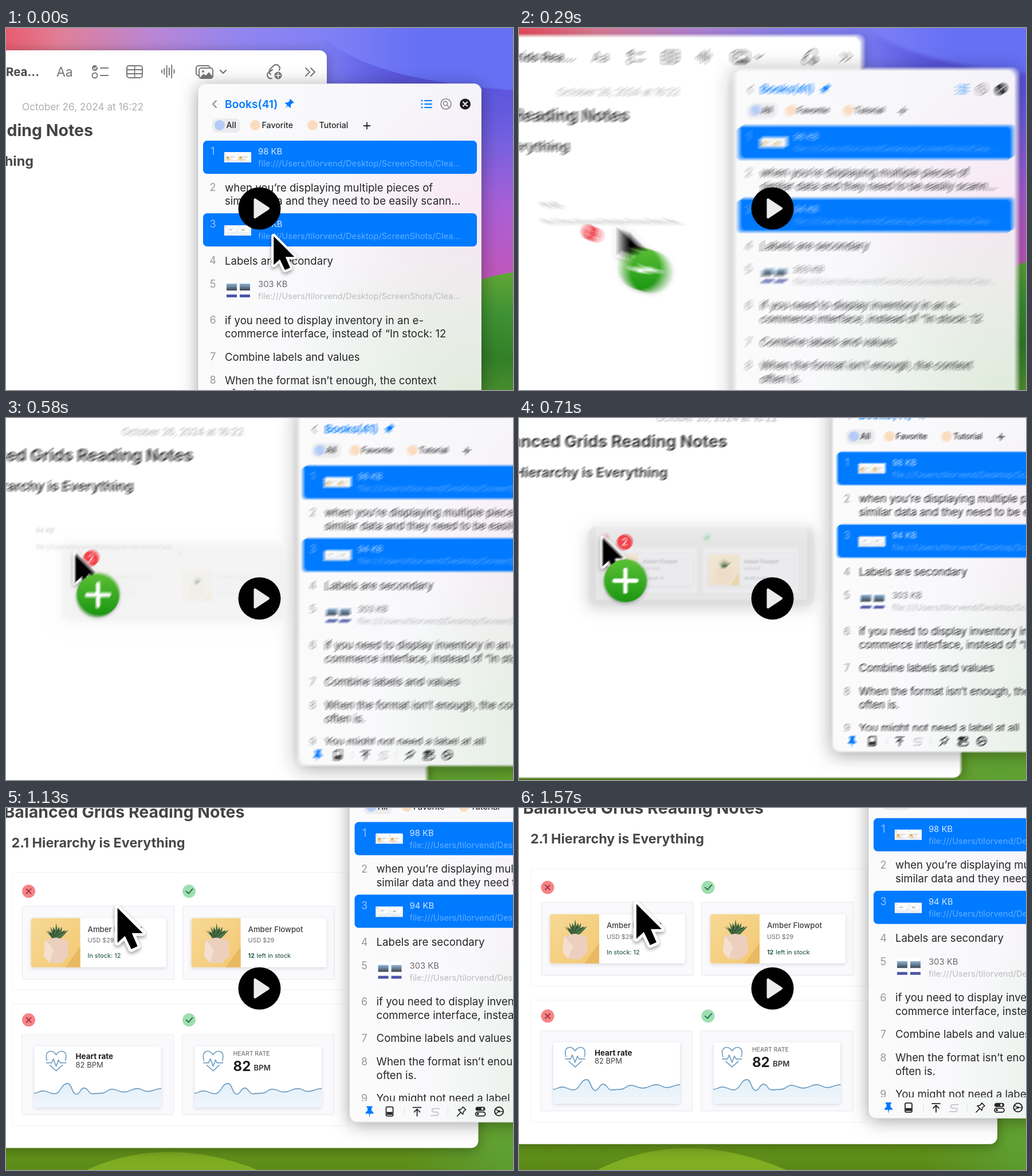
Recreate the animation shown at these times as an HTML page with a canvas. Size 885 by 633 pixels, loop 1630 ms.

```html
<!DOCTYPE html>
<html lang="en">
<head>
<meta charset="utf-8">
<title>Drag to notes</title>
<style>
html, body { margin: 0; width: 100%; height: 100%; overflow: hidden; background: #fff; }
canvas { display: block; width: 885px; height: 633px; }
</style>
</head>
<body>
<canvas id="stage" width="885" height="633"></canvas>
<script>
const W = 885, H = 633, LOOP = 1630, STEP = 1000 / 24, SHUTTER = 24;
const out = document.getElementById('stage').getContext('2d');
const buffer = Object.assign(document.createElement('canvas'), { width: W, height: H });
const g = buffer.getContext('2d', { alpha: false });
const BLUE = '#007aff', GRAY = '#77777a', INK = '#262628';
const PATH = 'file:///Users/tilorvend/Desktop/ScreenShots/Clea...';

const ramp = (t, a, b) => Math.min(1, Math.max(0, (t - a) / (b - a)));
// Critically damped spring from 0 to 1
const spring = (t, start, speed) => {
  const x = Math.max(0, t - start) * speed;
  return 1 - (1 + x) * Math.exp(-x);
};

function text(s, x, y, size, color = INK, weight = 400, align = 'left') {
  g.font = `${weight} ${size}px Inter, sans-serif`;
  g.fillStyle = color;
  g.textAlign = align;
  g.fillText(s, x, y + size * 0.35);
}
function box(x, y, w, h, r, fill, stroke, lw = 1) {
  g.beginPath();
  g.roundRect(x, y, w, h, r);
  if (fill) { g.fillStyle = fill; g.fill(); }
  if (stroke) { g.strokeStyle = stroke; g.lineWidth = lw; g.stroke(); }
}
function dot(x, y, r, fill, stroke, lw = 2) {
  g.beginPath();
  g.arc(x, y, r, 0, 7);
  if (fill) { g.fillStyle = fill; g.fill(); }
  if (stroke) { g.strokeStyle = stroke; g.lineWidth = lw; g.stroke(); }
}
function shape(d, fill) {
  g.fillStyle = fill;
  g.fill(new Path2D(d));
}
function line(d, color, lw = 2) {
  g.strokeStyle = color;
  g.lineWidth = lw;
  g.stroke(new Path2D(d));
}
function at(x, y, scale, draw) {
  g.save();
  g.translate(x, y);
  g.scale(scale, scale);
  draw();
  g.restore();
}
function shadowed(color, blur, dy, draw) {
  g.save();
  g.shadowColor = color;
  g.shadowBlur = blur;
  g.shadowOffsetY = dy;
  draw();
  g.restore();
}
function gradient(x0, y0, x1, y1, ...colors) {
  const grad = g.createLinearGradient(x0, y0, x1, y1);
  colors.forEach((c, i) => grad.addColorStop(i / (colors.length - 1), c));
  return grad;
}
function glow(x, y, r, rgb, alpha) {
  const grad = g.createRadialGradient(x, y, 0, x, y, r);
  grad.addColorStop(0, `rgba(${rgb},${alpha})`);
  grad.addColorStop(1, `rgba(${rgb},0)`);
  g.fillStyle = grad;
  g.fillRect(x - r, y - r, 2 * r, 2 * r);
}

function wallpaper() {
  g.fillStyle = gradient(-60, 0, 720, 0, '#ee4556', '#e08098', '#bb86d4', '#9285f0', '#7f80f6', '#6670f4');
  g.fillRect(-300, -10, 1300, 840);
  shape('M540 0 C590 60 690 95 900 110 L900 260 L540 200Z', gradient(550, 0, 690, 0, 'rgba(90,85,220,0)', '#5a55dc'));
  g.fillStyle = gradient(0, 90, 0, 420, 'rgba(104,94,228,0)', '#7660e0', '#a95fd6', '#bd58bd');
  g.fillRect(760, 90, 240, 380);
  shape('M-300 640 Q700 480 830 440 Q870 424 1000 415 V830 H-300Z',
    gradient(0, 420, 0, 812, '#65a936', '#3f9334', '#327f27', '#4f9230', '#6fa41e', '#5a8717'));
  shape('M-170 830 Q10 718 230 830Z', '#7fae22');
  glow(630, 770, 200, '92,162,56', 0.9);
}

function photoIcon() {
  box(-64, -49, 128, 98, 9, null, '#8e8e93', 6);
  dot(-25, -14, 14, '#8e8e93');
  shape('M-62 30 L-33 8 L-12 24 L20 -5 L62 29 V44 Q62 50 54 50 H-54 Q-62 50 -62 44Z', '#8e8e93');
}
function verdicts(y) {
  dot(28, y, 11.5, '#f58486');
  line(`M24 ${y - 4} l8 8 m0 -8 l-8 8`, '#a3343b', 2);
  dot(308, y, 11.5, '#9ee0b1');
  line(`M303 ${y} l4 4 l7 -8`, '#276e42', 2);
}
function card(frameX, frameY, frameH, x, y, w, h) {
  box(frameX, frameY, 265, frameH, 1, '#fafafd', '#e8e8ee');
  shadowed('rgba(60,60,90,.18)', 6, 2, () => box(x, y, w, h, 4, '#fff'));
}
function planter(x) {
  at(x, 0, 1, () => {
    card(17, 59, 128, 32, 80, 236, 86);
    box(32, 80, 86, 86, [4, 0, 0, 4], gradient(32, 80, 118, 166, '#f7d995', '#f3c873'));
    shape('M92 166 L118 130 V166Z', '#e9b862');
    for (let i = -4; i <= 4; i++) {
      const tip = 76 + i * 5.2, top = 89 + Math.abs(i) * 3 + (i & 1) * 3;
      shape(`M70 117 Q${74 + i * 3} 105 ${tip} ${top} Q${80 + i * 3} 108 82 117Z`, i & 1 ? '#2f4f33' : '#4c7348');
    }
    shape('M57 118 L75 114 L96 118 L98 146 L85 159 L64 158 L54 146Z', '#ecd0bd');
    shape('M57 118 L72 136 L64 158 L54 146Z', '#f4dfd0');
    text('Amber Flowpot', 131, 100, 13.2, '#3c3c40', 500);
    text('USD $29', 131, 119, 10.8, '#6c6c70');
    if (x) {
      text('12', 131, 146, 10.8, '#1f5c50', 700);
      text('left in stock', 146, 146, 10.8, '#2f5d55', 500);
    } else text('In stock: 12', 131, 146, 10.8, '#2f5d55', 500);
  });
}
function heartRate(x) {
  at(x, 0, 1, () => {
    card(16, 54, 140, 38, 74, 221, 107);
    at(x ? 70 : 76, 100, 1, () => {
      line('M-16 -1 C-22 -20 -5 -21 0 -11 C5 -21 22 -20 16 -1 M-11 7 L0 17 L11 7', '#6f9cc0', 1.6);
      line('M-17 3 H-8 L-5 -4 L0 9 L4 -2 L7 3 H17', '#6f9cc0', 1.6);
    });
    const wave = [38, 156, 53, 152, 73, 157, 96, 139, 111, 158, 125, 147, 139, 157, 156, 156, 173, 149, 194, 154, 218, 148, 236, 153, 259, 148];
    let d = `M${wave[0]} ${wave[1]}`;
    for (let i = 2; i < wave.length; i += 2) {
      const mid = (wave[i - 2] + wave[i]) / 2;
      d += `C${mid} ${wave[i - 1]} ${mid} ${wave[i + 1]} ${wave[i]} ${wave[i + 1]}`;
    }
    shape(d + 'V181 H38Z', gradient(0, 139, 0, 181, '#e2eff9', '#f1f7fc'));
    line(d, '#6c9abf', 1.6);
    if (x) {
      text('HEART RATE', 105, 87, 10.4, '#77777c', 500);
      text('82', 105, 109, 24, '#1d1d1f', 700);
      text('BPM', 141, 112, 13.2, '#333', 600);
    } else {
      text('Heart rate', 110, 92, 13.4, '#1d1d1f', 700);
      text('82 BPM', 110, 107, 13, '#444');
    }
  });
}
function picture(kind) {
  box(0, 0, 586, kind ? 213 : 206, 0, '#fff', '#f2f2f4');
  verdicts(kind ? 28 : 33);
  [0, 280].forEach(kind ? heartRate : planter);
}

function notesToolbar() {
  text('Balanced Grids Rea...', 58, 77, 20.5, '#48484a', 700, 'right');
  text('Aa', 88, 77, 23, GRAY);
  dot(155, 70, 5, GRAY);
  dot(155, 83, 4.5, null, GRAY);
  line('M152.5 70 l2 2 l3.5 -4', '#fff', 1.5);
  line('M165 70 H178 M165 83 H178', GRAY, 2.2);
  box(211, 66, 27, 21, 4, null, GRAY, 2);
  line('M211 73 H238 M211 80 H238 M224.5 66 V87', GRAY, 1.8);
  [2, 5, 10, 6, 11, 3].forEach((h, i) => line(`M${272 + i * 4.3} ${76 - h} v${2 * h}`, GRAY));
  box(332, 66, 24, 17, 4, null, GRAY, 2);
  box(337, 70, 24, 18, 4, '#fff', GRAY, 2);
  dot(344, 76, 2, GRAY);
  shape('M339 86 L345 80 L349 83 L354 77 L360 84 V87 H340Z', GRAY);
  line('M374 74 l5 5 l5 -5', GRAY, 2.4);
  line('M470 81 L476 75 A6 6 0 0 0 467 66 L461 72 A6 6 0 0 0 462 81 M465 73 L458 78 A6 6 0 0 0 464 88', GRAY, 2.2);
  dot(475, 83, 7.5, GRAY, '#fff');
  line('M471 83 h8 m-4 -4 v8', '#fff', 1.6);
  line('M523 70 l7 7 l-7 7 M532 70 l7 7 l-7 7', GRAY, 2);
}
function notes(t) {
  shadowed('rgba(0,0,0,.35)', 22, 4, () => box(-420, 39, 980, 728, 13, '#fff'));
  notesToolbar();
  text('October 26, 2024 at 16:22', 28, 138, 17.2, '#b0b0b3');
  text('Balanced Grids Reading Notes', 152, 179, 28.5, '#444446', 700, 'right');
  text('2.1 Hierarchy is Everything', 48, 233, 23.4, '#48484a', 700, 'right');
  if (t < 790) return;
  [0, 1].forEach(kind => at(-253, kind ? 515 : 285, 1, () => {
    if (t > 1000) return picture(kind);
    const h = kind ? 213 : 206;
    box(0, 0, 586, h, 0, '#c9c9ce');
    at(293 + kind * 4, h / 2, 1, photoIcon);
  }));
}

function pin(x, y, scale, angle) {
  at(x, y, scale, () => {
    g.rotate(angle);
    shape('M-5 -9 H5 V-7 L3.5 -6 V-1 Q7 1 7 4 H1 L0 11 L-1 4 H-7 Q-7 1 -3.5 -1 V-6 L-5 -7Z', BLUE);
  });
}
function panelHeader() {
  line('M367 127 l-6 6 l6 6', '#88888c', 1.8);
  text('Books(41)', 382, 133, 19.2, BLUE, 600);
  pin(494, 133, 0.9, 0.75);
  for (let y = 127; y < 141; y += 6) {
    dot(726, y, 1.4, BLUE);
    line(`M731 ${y} H743`, BLUE, 1.8);
  }
  dot(768, 133, 9, null, '#808084', 1.5);
  dot(767, 132, 3.6, null, '#808084', 1.5);
  line('M770 135 l3 3', '#808084', 1.5);
  dot(801.5, 133, 9.5, '#1c1c1e');
  line('M798 129.5 l7 7 m0 -7 l-7 7', '#fff', 2);
  box(360, 158, 49, 25, 9, '#ececef');
  [[373, 'All', '#b5ccf8'], [435, 'Favorite', '#fbdcbf'], [535, 'Tutorial', '#fbdcbf']].forEach(([x, label, c]) => {
    dot(x, 170, 9, c);
    text(label, x + 11.5, 170, 14.2, INK, 500);
  });
  line('M624.5 171 h11 m-5.5 -5.5 v11', INK, 1.8);
}
function fileRow(n, y, size, selected) {
  if (selected) box(344, y - 19, 478, 58, 7, BLUE);
  text(n, 361, y, 18, selected ? '#8dc2ff' : '#98989c', 400, 'center');
  text(size, 440, y, 14.8, selected ? '#d5e8ff' : '#6c6c70');
  text(PATH, 440, y + 21, 14.7, selected ? '#62aeff' : '#bcbcc0');
}
function textRow(n, y, ...lines) {
  text(n, 361, y, 18, '#98989c', 400, 'center');
  lines.forEach((s, i) => text(s, 382, y + i * 23.5, 18.6));
}
function panelToolbar() {
  pin(370, 703, 1, 0);
  box(399, 695, 12, 16, 2, null, INK, 1.8);
  box(400, 704, 10, 5, 0, INK);
  line('M431 697 v12 M507 697 v12', '#dcdcde', 1);
  line('M446 696 h14 M453 711 v-12 m-5 5 l5 -5 l5 5', INK, 1.8);
  line('M492 698 h-10 a3 3 0 0 0 0 6 h5 a3 3 0 0 1 0 6 h-10', '#c4c4c8', 1.8);
  line('M523 711 l6 -6 m-4 -5 l8 8 l1 -5 l4 -3 l-5 -5 l-3 4z', INK, 1.6);
  box(555, 695, 17, 7, 3.5, INK);
  box(555, 704, 17, 7, 3.5, null, INK, 1.8);
  dot(567, 698.5, 2, '#fff');
  dot(559, 707.5, 2, INK);
  dot(596, 703, 7.5, null, INK, 2);
  dot(596, 703, 2, INK);
  line('M596 703 L590 699 M596 703 L590 707 M596 703 H603', INK, 1.3);
}
function panel() {
  shadowed('rgba(0,0,0,.36)', 30, 4, () => box(335, 97, 495, 625, 14, '#f7f7fa'));
  g.save();
  box(335, 97, 495, 625, 14, gradient(335, 0, 830, 0, '#fbfbfc', '#f5f5fa'));
  g.clip();
  glow(810, 350, 270, '250,222,240', 0.6);
  glow(800, 650, 330, '217,232,211', 0.75);
  panelHeader();
  fileRow(1, 216, '98 KB', true);
  box(381, 217, 47, 18, 0, '#fff');
  at(381, 218, 0.08, () => picture(0));
  textRow(2, 279, 'when you’re displaying multiple pieces of', 'similar data and they need to be easily scann...');
  fileRow(3, 343, '94 KB', true);
  box(381, 345, 47, 18, 0, '#fff');
  at(381, 345, 0.08, () => picture(1));
  textRow(4, 407, 'Labels are secondary');
  fileRow(5, 448, '303 KB', false);
  [385, 408].forEach(x => {
    box(x, 441, 18, 32, 0, '#fff');
    box(x, 447, 18, 12, 0, gradient(0, 447, 0, 459, '#8fb5d6', '#3a4650'));
    box(x, 466, 18, 5, 0, '#4b55a8');
  });
  textRow(6, 511, 'if you need to display inventory in an e-', 'commerce interface, instead of “In stock: 12');
  textRow(7, 575, 'Combine labels and values');
  textRow(8, 616, 'When the format isn’t enough, the context', 'often is.');
  g.save();
  g.beginPath();
  g.rect(335, 660, 495, 25);
  g.clip();
  textRow(9, 680, 'You might not need a label at all');
  g.restore();
  panelToolbar();
  g.restore();
  box(335, 97.5, 495, 624, 14, null, 'rgba(0,0,0,.1)');
}

function pointer(t) {
  const p = spring(t, 107, 0.0111);
  const x = 464 - 538 * p, y = 356 - 19 * p ** 8 + 56 * p * (1 - p);
  const dragging = t > 100 && t < 960;
  at(x, y, 1, () => {
    // Dragged rows, then a preview of the dropped picture
    if (dragging && t < 620) {
      g.globalAlpha = ramp(t, 120, 230) * (1 - ramp(t, 540, 620));
      const left = -138 + 73 * ramp(t, 290, 460);
      text('94 KB', left, -33, 11, '#88888c');
      text(PATH, left, -4, 10.2, '#a4a4a8');
    }
    const ghost = ramp(t, 560, 680) * (1 - ramp(t, 740, 790));
    if (ghost) {
      g.globalAlpha = ghost * 0.5;
      shadowed('rgba(0,0,0,.3)', 24, 4, () => box(-22, -11, 394, 138, 14, '#dededf'));
      at(-9, -13, 0.63, () => { g.globalAlpha *= 0.6; picture(0); });
    }
    g.globalAlpha = 1;
    if (dragging && t > 200 && t < 790) {
      const bx = -52 + 72 * ramp(t, 290, 460) + 22 * ramp(t, 460, 710);
      dot(bx, 16, 13.5, '#f2434c');
      text(2, bx, 16, 17, '#fff', 500, 'center');
    }
    at(0, 0, 0.82 + 0.18 * ramp(t, 940, 1060), () => {
      const arrow = 'M4 10 V71 L17 59 L28 82 L39 77 L29 54 H48Z';
      shadowed('rgba(0,0,0,.4)', 6, 3, () => line(arrow, '#fff', 10));
      shape(arrow, '#000');
    });
    if (dragging && t > 220) {
      at(43, 80 + 12 * ramp(t, 640, 880), ramp(t, 200, 280), () => {
        shadowed('rgba(0,0,0,.3)', 6, 2, () => dot(0, 0, 37.5, gradient(0, -37, 0, 37, '#5cc136', '#1c9712')));
        const arm = 19 * ramp(t, 270, 400);
        line(`M-19 0 H19 M0 ${-arm} V${arm}`, '#fff', 7.5);
      });
    }
  });
}

function scene(t) {
  const pan = spring(t, 160, 0.00505);
  g.setTransform(1, 0, 0, 1, 277 * pan, -180.5 * pan);
  g.lineCap = g.lineJoin = 'round';
  wallpaper();
  notes(t);
  panel();
  pointer(t);
}

function playButton() {
  out.fillStyle = '#000';
  out.beginPath();
  out.arc(442.5, 315.5, 37, 0, 7);
  out.fill();
  const triangle = new Path2D('M434.5 300 L458 315.5 L434.5 331Z');
  out.fillStyle = out.strokeStyle = '#ececee';
  out.lineWidth = 4;
  out.lineJoin = 'round';
  out.fill(triangle);
  out.stroke(triangle);
}

let shown = -1;
function tick(now) {
  const step = Math.floor((now % LOOP) / STEP + 0.15);
  if (step !== shown) {
    shown = step;
    const t = step * STEP;
    const samples = t > 90 && t < 1100 ? 8 : 1;
    // Average several moments within the shutter for motion blur
    for (let i = 0; i < samples; i++) {
      scene(t + ((i + 0.5) / samples - 0.5) * SHUTTER);
      out.globalAlpha = 1 / (i + 1);
      out.drawImage(buffer, 0, 0);
    }
    out.globalAlpha = 1;
    playButton();
  }
  requestAnimationFrame(tick);
}
tick(0);
</script>
</body>
</html>
```
